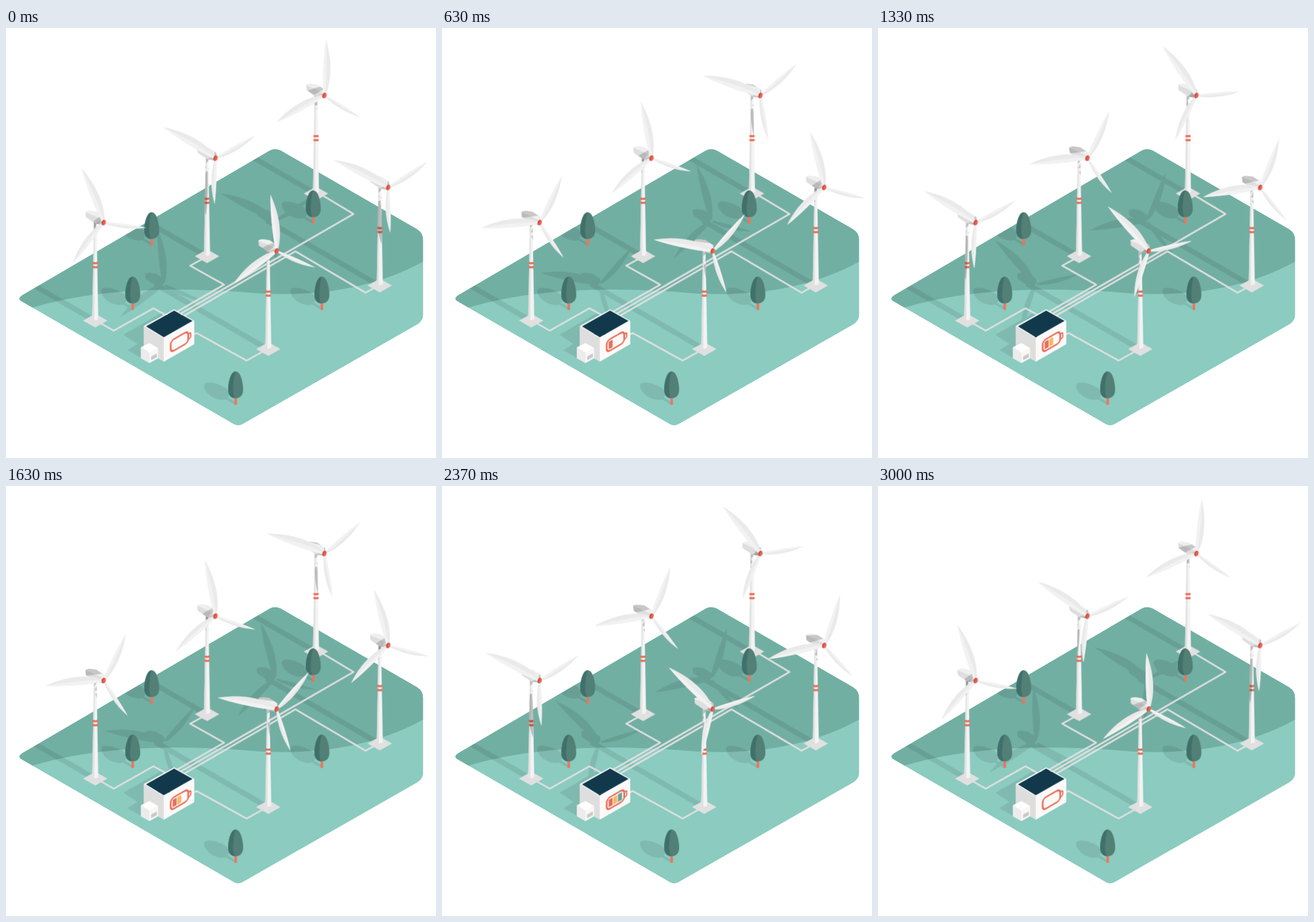
Animation of 748 by 748 pixels, one loop 3030 ms. Source, as an HTML page:

```html
<!DOCTYPE html>
<html lang="en">
<head>
<meta charset="utf-8">
<title>Wind farm</title>
<style>
html, body { margin: 0; height: 100%; overflow: hidden; background: #fff }
svg { display: block; width: 100%; height: 100% }
</style>
</head>
<body>
<svg viewBox="-.5 -.5 748 748">
  <defs>
    <path id="land" d="M30,463 L457,213.500 Q467,207.500 478,213 L714.500,349.500 Q725,356 725,368 V498 Q725,509 715,515 L411,688.500 Q403,693 395,688 L26,474.500 Q18,470 30,463Z"/>
    <clipPath id="landClip"><use href="#land"/></clipPath>
    <path id="mast" d="M-17,0 H-12.500 L-9.500,168 Q-14.700,172 -20,168Z"/>
    <clipPath id="mastClip"><use href="#mast"/></clipPath>
    <path id="cabin" d="M-32,-18 Q-31,-20 -24,-20.500 L-13,-19 L1,-10 L2,-3 L-4,4 L-15,1.500 L-31,-9.500Z"/>
    <clipPath id="cabinClip"><use href="#cabin"/></clipPath>
    <g id="tree">
      <rect x="-2.200" y="44" width="4.400" height="14" rx="1" fill="#ef7459"/>
      <path fill="#527f76" d="M0,0 C9,0 13,20 13,32 C13,42 7,46.500 0,46.500 C-7,46.500 -13,42 -13,32 C-13,20 -9,0 0,0"/>
      <path fill="#41706b" d="M0,0 C-9,0 -13,20 -13,32 C-13,42 -7,46.500 -1,46.500 C-5,42 -5,30 -4,22 C-3.500,10 -1,2 0,0"/>
    </g>
    <g id="treeShade">
      <path d="M-55,24 C-53,15 -30,20 -17,29 C-8,36 -11,48 -20,49 C-38,51 -55,36 -55,24"/>
      <path d="M-17,46 L0,56" stroke="#000" stroke-width="4"/>
    </g>
    <g id="tower">
      <use href="#mast" fill="#f3f3f3"/>
      <path fill="#e0e0e0" d="M-17,0 H-15.300 L-16.500,170 L-20,168Z"/>
      <path fill="#bdbdbd" d="M-17,0 H-12.500 V5 L-16.800,9Z"/>
      <path fill="none" stroke="#ec6d58" stroke-width="3.600" d="M-19,70 Q-14.700,71.500 -10.400,70 M-19,77 Q-14.700,78.500 -10.300,77"/>
    </g>
    <g id="head">
      <use href="#cabin" fill="#dedede"/>
      <path fill="#efefef" d="M-32,-18 Q-31,-20 -24,-20.500 L-13,-19 L1,-10 L0,-3 L-14,-10.500Z"/>
      <path fill="#c2c2c2" d="M-15,1.500 L-4,-3 L-2,3 L-7,3Z"/>
    </g>
    <g id="nose" transform="rotate(20)">
      <ellipse rx="3.600" ry="5" fill="#ec6552"/>
      <path fill="#cb4f40" d="M0,-5 A3.600,5 0 0 0 0,5 Q-1.500,0 0,-5"/>
    </g>
  </defs>

  <use href="#land" fill="#8bcbc0"/>
  <path clip-path="url(#landClip)" fill="#72afa3" d="M0,500 L45,486 C150,455 270,450 400,458 C520,470 630,458 725,406 L748,395 V150 H0Z"/>
  <g clip-path="url(#landClip)"><g id="shade" opacity=".09">
    <path d="M204,533 L270,495 L295,500 L240,572 L234,573 L211,560 L228,549Z"/>
  </g></g>
  <path fill="none" stroke="#e0e0e0" stroke-width="3.100" stroke-linejoin="round" d="M539,284 L604,323 L304,496 M349,397 L320,413 L379,446 L290,497 M650,446 L625,460 L503,388 L304,503 M155,508 L187,526 L256,487 L285,503 M456,557 L418,578 L331,530 L320,536"/>
  <g id="scene"></g>

  <path fill="#fff" d="M239,518 L292,489 L327,509 L274,540Z"/>
  <path fill="#12394b" d="M243,518.500 L292,491 L324,509 L274,537.500Z"/>
  <path fill="#dedede" d="M239,518 L274,539 V580 L239,560Z"/>
  <path fill="#fbfaf9" d="M274,539 L327,509 V549.500 L274,580Z"/>
  <path fill="#fff" d="M234,555 L249,547.500 L264,556 L249,564.500Z"/>
  <path fill="#ececec" d="M234,555 L249,564 V582.500 L234,574Z"/>
  <path fill="#f9f8f7" d="M249,564 L264,556 V574 L249,582.500Z"/>
  <path fill="#c9c9c9" d="M252,571 L262,565.500 V572 L252,577.500Z"/>
  <g transform="translate(286 554) skewY(-30)">
    <g id="bars">
      <rect x="3.500" y="-6.500" width="6.800" height="13" fill="#ec6d58"/>
      <rect x="11.500" y="-6.500" width="6.800" height="13" fill="#f8b765"/>
      <rect x="19.500" y="-6.500" width="7.200" height="13" fill="#5fa697"/>
    </g>
    <g fill="none" stroke="#ec6d58">
      <rect y="-10" width="30.500" height="20" rx="6" stroke-width="3"/>
      <path d="M31,-4.500 H33 Q34.800,-4.500 34.800,-2.500 V2.500 Q34.800,4.500 33,4.500 H31" stroke-width="2.200"/>
    </g>
  </g>
  <g id="front"></g>
</svg>
<script>
const $ = id => document.getElementById(id);
const rad = Math.PI / 180;

// Hub position and starting angle of each turbine, back to front.
const turbines = [
  [553.5, 117, -0.8], [364, 226, 58.7], [664.5, 277, 55],
  [169.5, 338, -24.7], [470.5, 387.5, -8.8]
].map(([x, y, phase]) => ({ x, y, phase }));
const trees = [[253, 320], [534, 282], [220, 432], [549, 432], [399, 597]];

// Rotor disc seen in perspective: the hub lies off centre by `skew` radii towards `tilt`.
const R = 89.5, skew = 0.187, tilt = 122 * rad;
const flat = Math.sqrt(1 - skew * skew), dx = Math.sin(tilt), dy = -Math.cos(tilt);

function project(r, s, a) {
  s *= 1 - 0.3 * Math.cos(a);
  const x = r * Math.cos(a) - s * Math.sin(a), y = r * Math.sin(a) + s * Math.cos(a);
  const w = 1 + skew * x;
  const X = R * ((x + skew) / w - skew), Y = R * flat * y / w;
  return (X * dx - Y * dy).toFixed(2) + ',' + (X * dy + Y * dx).toFixed(2);
}

// Outline points are radius and sideways offset, in disc radii.
const lead = [[.03, -.02], [.35, -.04], [.7, -.035], [1, 0]];
const shapes = {
  full: [...lead, [.75, .08], [.4, .14], [.04, .03]],
  edge: [...lead, [.75, .02], [.4, .04], [.03, .01]]
};

const rotor = (shape, deg) => [0, 120, 240].map(k => {
  const p = shape.map(([r, s]) => project(r, s, (deg + k) * rad));
  return `M${p[0]}C${p.slice(1, 4).join(' ')} ${p.slice(4).join(' ')}Z`;
}).join('');

const add = (id, markup) => $(id).insertAdjacentHTML('beforeend', markup);
const at = (x, y) => `transform="translate(${x} ${y})"`;
const blades = (t, shape, attrs = '') => `<path data-shape="${shape}" data-phase="${t.phase}" ${attrs}/>`;

const shadeOf = t => `<g ${at(t.x, t.y)}>
  <path d="M-14.700,171 L-212,57" stroke="#000" stroke-width="9"/>
  <g ${at(-197, 58)}><use href="#cabin"/>${blades(t, 'full')}</g></g>`;

const turbine = t => `<g ${at(t.x, t.y)}>
  <path fill="#e0e0e0" d="M-36,170.500 L-14.700,158.500 L6.500,170.500 L-14.700,182.500Z"/>
  <use href="#tower"/>
  <g clip-path="url(#mastClip)">${blades(t, 'full', at(-15, 20) + ' opacity=".22"')}</g>
  <use href="#head"/>
  <g clip-path="url(#cabinClip)">${blades(t, 'full', at(1, -15) + ' opacity=".17"')}</g>
  ${blades(t, 'full', 'fill="#eaeaea"')}${blades(t, 'edge', 'fill="#f2f2f2"')}
  <use href="#nose"/></g>`;

turbines.forEach((t, i) => {
  add('shade', shadeOf(t));
  add(i < 4 ? 'scene' : 'front', turbine(t));
  if (i == 0) trees.forEach(p => {
    add('shade', `<use href="#treeShade" ${at(...p)}/>`);
    add('scene', `<use href="#tree" ${at(...p)}/>`);
  });
});

const rotors = document.querySelectorAll('[data-shape]');
const bars = [...$('bars').children];

function draw(now) {
  const ms = now % 3030;
  // 30 steps a second, four degrees each, resting on the first.
  const step = Math.max(0, Math.floor((ms + 4) * 0.03) - 1);
  for (const el of rotors)
    el.setAttribute('d', rotor(shapes[el.dataset.shape], el.dataset.phase - 4 * step));
  bars.forEach((bar, i) =>
    bar.setAttribute('visibility', ms >= 400 + 750 * i && ms < 2650 ? 'visible' : 'hidden'));
}

const start = performance.now();
(function loop() {
  draw(performance.now() - start);
  requestAnimationFrame(loop);
})();
</script>
</body>
</html>
```
